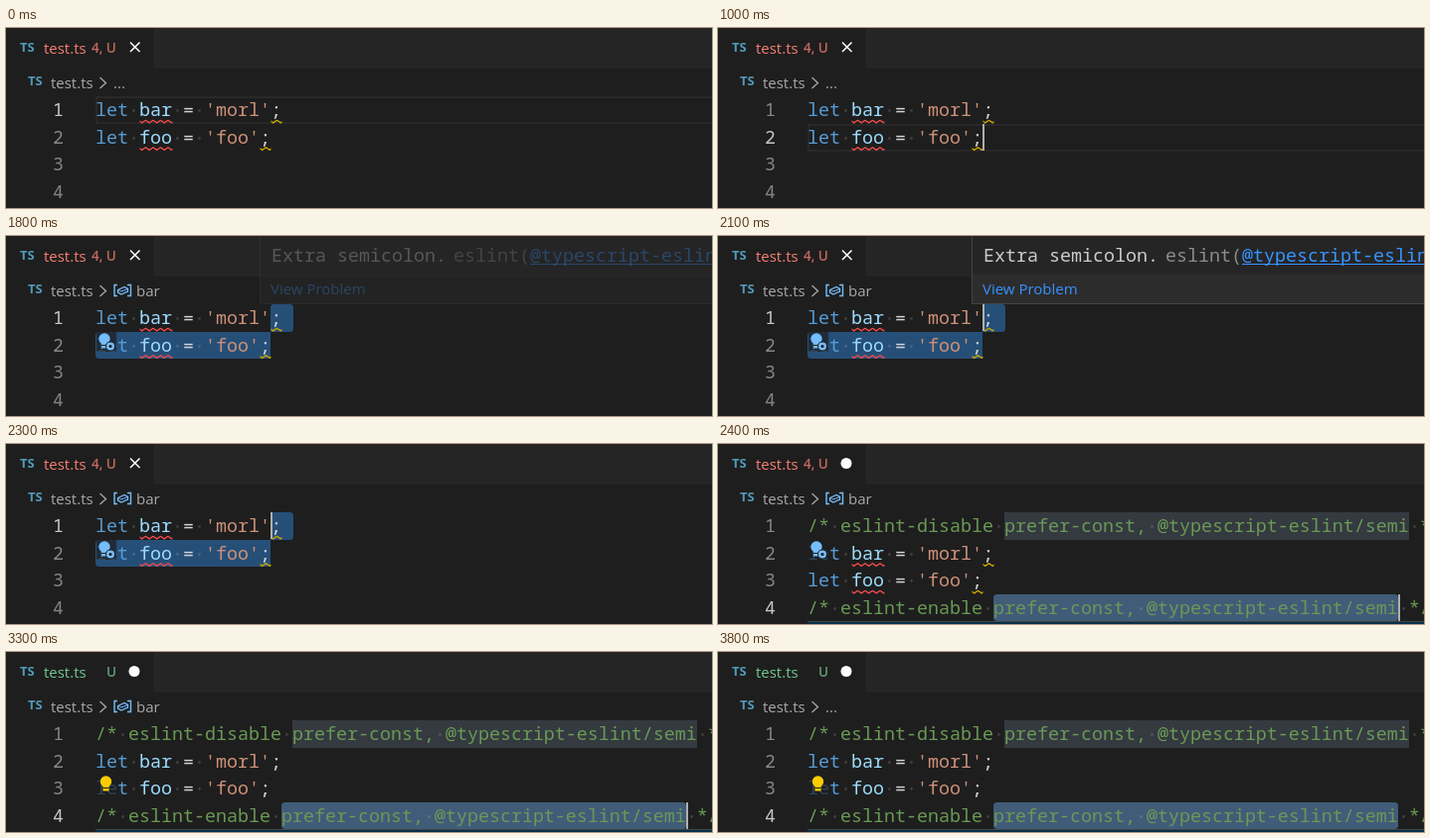
Animation, 710 px wide and 182 px high, one loop 4000 ms. Source, as an HTML page with a canvas:

```html
<!DOCTYPE html>
<html lang="en">
<head>
<meta charset="utf-8">
<title>Editor quick fix</title>
<style>
html, body { margin: 0; width: 100%; height: 100%; overflow: hidden; background: #1e1e1e; }
canvas { display: block; width: 710px; height: 182px; }
</style>
</head>
<body>
<canvas id="stage" width="710" height="182"></canvas>
<script>
const ctx = document.getElementById('stage').getContext('2d');
const LOOP = 4000;
const LEFT = 90, TOP = 69, ROW = 27.5, CELL = 11;
const MONO = '18.33px "Noto Sans Mono", monospace';
const CODE = `500 ${MONO}`;
const UI = '"Open Sans", sans-serif';
const C = {
  bg: '#1e1e1e', strip: '#252526', keyword: '#569cd6', variable: '#9cdcfe',
  plain: '#d4d4d4', string: '#ce9178', comment: '#6a9955', icon: '#519aba',
  crumb: '#a9a9a9', error: '#f14c4c', warning: '#cca700', link: '#3794ff',
  blue: '#75beff', yellow: '#ffcc00', border: '#454545'
};

const rules = 'prefer-const, @typescript-eslint/semi';
const assign = (name, value) => [
  ['let', C.keyword], [' '], [name, C.variable], [' '], ['=', C.plain], [' '],
  [`'${value}'`, C.string], [';', C.plain]
];
const comment = action => [[`/* eslint-${action} ${rules} */`, C.comment]];
const body = [assign('bar', 'morl'), assign('foo', 'foo')];
const edited = [comment('disable'), ...body, comment('enable')];

const between = (t, a, b) => t >= a && t < b;
const colX = col => LEFT + col * CELL;
const rowY = row => Math.round(TOP + row * ROW);
const baseline = row => Math.round(89.2 + row * ROW);

function rect(x, y, w, h, color) {
  ctx.fillStyle = color;
  ctx.fillRect(x, y, w, h);
}

function roundRect(x, y, w, h, color, radii = 3.5) {
  ctx.fillStyle = color;
  ctx.beginPath();
  ctx.roundRect(x, y, w, h, radii);
  ctx.fill();
}

function disc(x, y, r, color) {
  ctx.fillStyle = color;
  ctx.beginPath();
  ctx.arc(x, y, r, 0, Math.PI * 2);
  ctx.fill();
}

function line(points, color, width, close) {
  ctx.strokeStyle = color;
  ctx.lineWidth = width;
  ctx.beginPath();
  points.forEach(([x, y]) => ctx.lineTo(x, y));
  if (close) ctx.closePath();
  ctx.stroke();
}

function text(str, x, y, color, font) {
  ctx.font = font;
  ctx.fillStyle = color;
  ctx.fillText(str, x, y);
}

const ui = (str, x, y, color) => text(str, x, y, color, `15px ${UI}`);
const badge = (str, x, y, color) => text(str, x, y, color, `600 13.5px ${UI}`);
const fileIcon = (x, y) => text('TS', x, y, C.icon, `bold 13px ${UI}`);

function drawCode(tokens, row) {
  const base = baseline(row);
  let col = 0;
  for (const [str, color] of tokens) {
    if (color) text(str, colX(col), base, color, CODE);
    for (const ch of str) {
      if (ch === ' ') disc(colX(col) + CELL / 2, base - 5.5, 1.4, 'rgba(227,228,226,0.17)');
      col++;
    }
  }
}

function squiggle(col, count, row, color) {
  const x = colX(col) + 0.5, w = count * CELL, bottom = TOP + (row + 1) * ROW;
  const points = [];
  for (let i = -1; i * 3.75 < w + 4; i++) {
    points.push([x + 2.2 + i * 3.75, bottom - (i % 2 ? 3.2 : 0.6)]);
  }
  ctx.save();
  ctx.beginPath();
  ctx.rect(x, bottom - 4, w, 4.5);
  ctx.clip();
  line(points, color, 1.3);
  ctx.restore();
}

function drawProblems(first) {
  for (const [i, semi] of [[0, 16], [1, 15]]) {
    squiggle(4, 3, first + i, C.error);
    squiggle(semi, 1, first + i, C.warning);
  }
}

function drawBulb(row, color, autofix) {
  const y = rowY(row);
  rect(LEFT + 1, y, 20, 20, 'rgba(30,30,30,0.7)');
  const x = autofix ? 99 : 100.5;
  disc(x, y + 7, 5.7, color);
  rect(x - 3, y + 10, 6, 6.5, color);
  line([[x - 3, y + 13.5], [x + 3, y + 13.5]], C.bg, 1);
  if (autofix) {
    disc(105, y + 14.5, 5, C.bg);
    disc(105, y + 14.5, 4, color);
    disc(105, y + 14.5, 1.6, C.bg);
  }
}

function drawTab(t) {
  const clean = t >= 2600;
  rect(148, 0, 562, 41, C.strip);
  fileIcon(14, 24);
  ui('test.ts', 38, 26, clean ? '#73c991' : '#f88070');
  if (clean) badge('U', 101, 25, '#5e9e75');
  else badge('4, U', 86, 25, '#c2685c');
  if (t >= 2400) {
    disc(129, 19.5, 5.5, '#ffffff');
  } else {
    line([[125, 14.5], [134.5, 24]], '#ffffff', 1.6);
    line([[134.5, 14.5], [125, 24]], '#ffffff', 1.6);
  }
}

function drawCrumbs(t) {
  fileIcon(22, 58);
  ui('test.ts', 45, 61, C.crumb);
  line([[94.5, 50], [100.5, 55.5], [94.5, 61]], C.crumb, 1.3);
  if (!between(t, 1500, 3500)) {
    ui('...', 108, 61, C.crumb);
    return;
  }
  line([[112, 49.5], [109, 49.5], [109, 60.5], [112, 60.5]], C.blue, 1.4);
  line([[122, 49.5], [125.5, 49.5], [125.5, 60.5], [122, 60.5]], C.blue, 1.4);
  line([[112.5, 54.5], [119, 51.5], [122.5, 53.5], [122.5, 56], [116, 59], [112.5, 57]], C.blue, 1.3, true);
  line([[112.5, 54.5], [116, 56], [122.5, 53.5]], C.blue, 1);
  ui('bar', 131, 61, C.crumb);
}

function drawHover(alpha) {
  ctx.save();
  ctx.globalAlpha = alpha;
  rect(255, -5, 460, 74, C.strip);
  rect(256, 39, 454, 29, '#2c2c2d');
  line([[255.5, -1], [255.5, 68.5], [711, 68.5]], C.border, 1);
  text('Extra semicolon.', 267, 26, '#cccccc', CODE);
  text('eslint(', 450, 26, '#8c8c8c', CODE);
  text('@typescript-eslint/semi', 527, 26, C.link, CODE);
  rect(527, 28, 183, 1, C.link);
  ui('View Problem', 266, 59, C.link);
  ctx.restore();
}

function drawBackgrounds(t) {
  if (t < 1200) {
    ctx.strokeStyle = '#282828';
    ctx.lineWidth = 2;
    ctx.strokeRect(LEFT + 1, rowY(t < 1000 ? 0 : 1) + 1, 640, 26);
  } else if (t < 2400) {
    roundRect(266, TOP, 23, 28, '#264f78', [3.5, 3.5, 3.5, 0]);
    roundRect(LEFT, 97, 176, 27, '#264f78', [3.5, 0, 3.5, 3.5]);
  } else {
    const w = rules.length * CELL;
    rect(colX(18), TOP, w, 28, '#343a40');
    roundRect(colX(17), rowY(3), w, 27, '#405c79');
    rect(LEFT, 179, 620, 1, C.border);
    rect(LEFT, 180, 620, 2, '#062f4a');
  }
}

function drawCursor(t) {
  let at = null;
  if (between(t, 1000, 1200)) at = [16, 1];
  else if (between(t, 1200, 1700) || between(t, 2100, 2400)) at = [16, 0];
  else if (between(t, 2400, 2800) || between(t, 3300, 3800)) at = [54, 3];
  if (at) rect(colX(at[0]), rowY(at[1]), 2, 27, '#aeafad');
}

function drawNumbers(active) {
  for (let row = 0; row < 4; row++) {
    const on = row === active;
    text(String(row + 1), 47, baseline(row), on ? '#c6c6c6' : '#858585', on ? CODE : MONO);
  }
}

function draw(t) {
  const fixed = t >= 2400;

  rect(0, 0, 710, 182, C.bg);
  drawTab(t);
  drawCrumbs(t);
  drawBackgrounds(t);
  drawNumbers(fixed ? 3 : between(t, 1000, 1200) ? 1 : 0);
  (fixed ? edited : body).forEach(drawCode);
  if (t < 2500) drawProblems(fixed ? 1 : 0);
  if (between(t, 1400, 2800)) drawBulb(1, C.blue, true);
  else if (t >= 2800) drawBulb(2, C.yellow, false);
  drawCursor(t);
  if (between(t, 1800, 2300)) drawHover(t < 1900 ? 0.3 : 1);
}

const start = performance.now();
function tick() {
  draw((performance.now() - start) % LOOP);
  requestAnimationFrame(tick);
}
tick();
</script>
</body>
</html>
```
